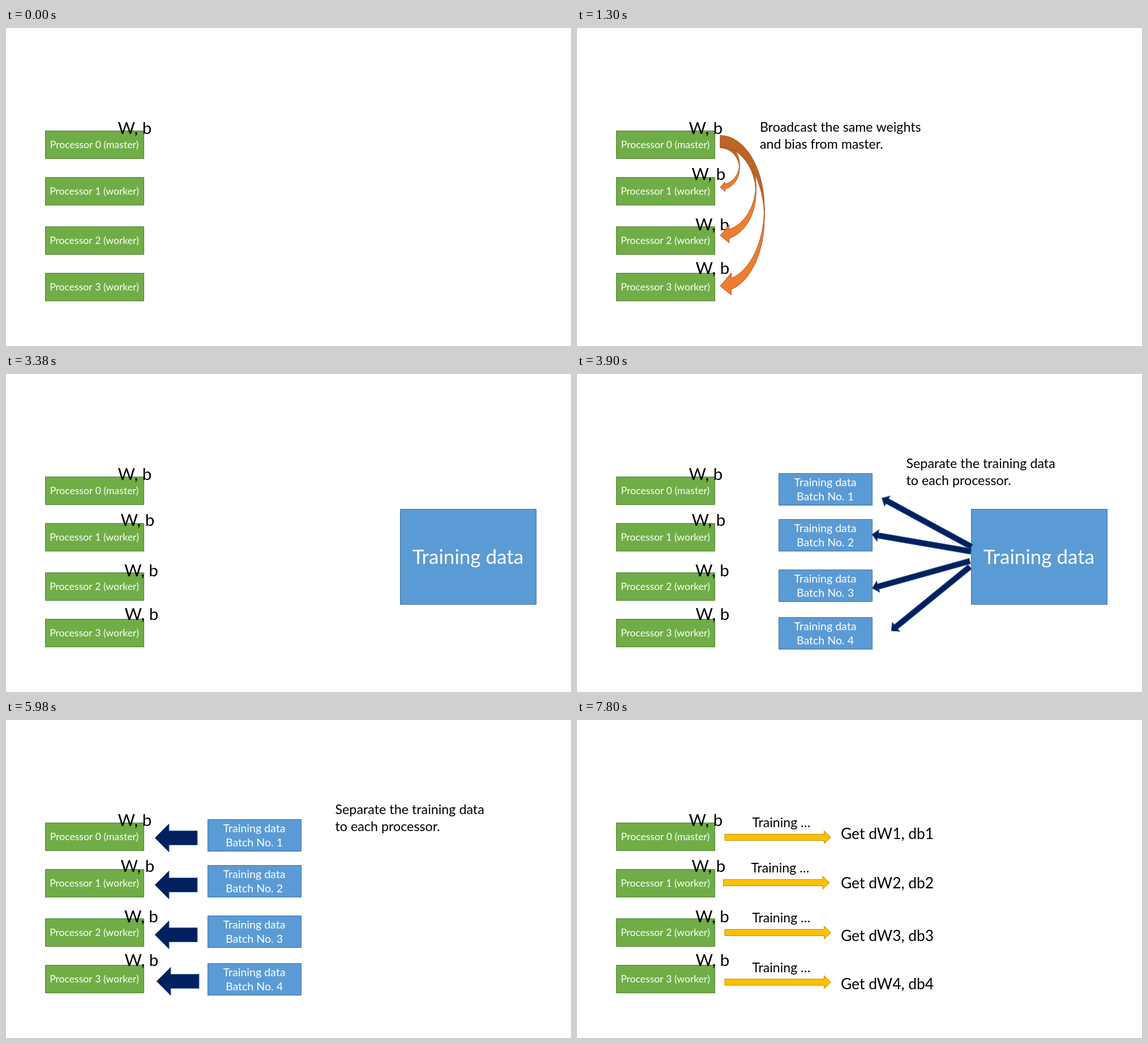
Write an HTML page with a canvas that moves like this. It is 998 px wide and 561 px high and loops after 8 s.

```html
<!DOCTYPE html>
<html lang="en">
<head>
<meta charset="utf-8">
<title>Data-parallel training</title>
<style>
  html, body { margin: 0; width: 100%; height: 100%; overflow: hidden; background: #fff; }
  canvas { display: block; }
</style>
</head>
<body>
<canvas id="stage" width="998" height="561"></canvas>
<script>
const ctx = document.getElementById('stage').getContext('2d');
const LOOP = 8000, STEP = 1300;
const GREEN = ['#70ad47', '#507e32'], BLUE = ['#5b9bd5', '#41719c'];
const NAVY = ['#002060', '#41719c'], GOLD = ['#ffc000', '#bc8c00'];
const ORANGE = ['#ed7d31', '#ae5a21'], RUST = ['#be6427', '#ae5a21'];

// One entry per processor row.
const rows = [
  { box: 181, wb: [197.5, 187], batch: 175, feed: [263, 208], train: [310, 189], run: [261, 207], get: 210 },
  { box: 263, wb: [202.5, 268], batch: 256, feed: [263, 291], train: [308, 269], run: [258.5, 287], get: 297 },
  { box: 350, wb: [209, 357], batch: 345, feed: [263, 379], train: [310, 357], run: [261, 375], get: 390 },
  { box: 432, wb: [209.5, 434], batch: 429, feed: [266, 461], train: [310, 445], run: [261, 462.5], get: 475 }
];

function paint([fill, line]) {
  ctx.fillStyle = fill;
  ctx.strokeStyle = line;
  ctx.lineWidth = 1;
  ctx.fill();
  ctx.stroke();
}

function box(x, y, w, h, colors) {
  ctx.beginPath();
  ctx.rect(x + .5, y + .5, w - 1, h);
  paint(colors);
}

function text(str, x, y, size, color = '#000', align = 'left') {
  ctx.font = `${size}px Lato, sans-serif`;
  ctx.textAlign = align;
  ctx.fillStyle = color;
  ctx.fillText(str, x, y);
}

// Straight block arrow from its tail to its tip.
function arrow(x0, y0, x1, y1, half, headLength, headHalf, colors) {
  const length = Math.hypot(x1 - x0, y1 - y0), neck = length - headLength;
  ctx.save();
  ctx.translate(x0, y0);
  ctx.rotate(Math.atan2(y1 - y0, x1 - x0));
  ctx.beginPath();
  ctx.moveTo(0, -half);
  ctx.lineTo(neck, -half);
  ctx.lineTo(neck, -headHalf);
  ctx.lineTo(length, 0);
  ctx.lineTo(neck, headHalf);
  ctx.lineTo(neck, half);
  ctx.lineTo(0, half);
  ctx.closePath();
  paint(colors);
  ctx.restore();
}

// Ribbon built from two equal ellipses, one shifted down by its thickness.
function curvedArrow(x, top, w, tipY) {
  const thick = w / 4, head = w / 4;
  const ry = (tipY - top - thick / 2) / 2;
  const upper = top + ry, lower = upper + thick;
  const bend = Math.acos(head / w);
  const neckY = upper + thick / 2 + ry * Math.sin(bend);

  ctx.beginPath();
  ctx.ellipse(x, lower, w, ry, 0, 0, bend);
  ctx.lineTo(x + head, neckY + w / 4);
  ctx.lineTo(x, tipY);
  ctx.lineTo(x + head, neckY - w / 4);
  ctx.ellipse(x, upper, w, ry, 0, bend, 0, true);
  ctx.closePath();
  paint(ORANGE);

  ctx.beginPath();
  ctx.ellipse(x, upper, w, ry, 0, -Math.PI / 2, 0);
  ctx.ellipse(x, lower, w, ry, 0, 0, -Math.PI / 2, true);
  ctx.closePath();
  paint(RUST);
}

function processors(shared) {
  rows.forEach(({ box: y }, i) => {
    box(69, y, 175, 49, GREEN);
    text(`Processor ${i} (${i ? 'worker' : 'master'})`, 156, y + 30.5, 17.6, '#fff', 'center');
  });
  rows.slice(0, shared ? 4 : 1).forEach(({ wb: [x, y] }) => text('W, b', x, y, 29.5));
}

function broadcast() {
  curvedArrow(253, 203, 34, 281);
  curvedArrow(253, 194, 63, 366);
  curvedArrow(253, 189.5, 78, 455.5);
  text('Broadcast the same weights', 323, 182.5, 23.2);
  text('and bias from master.', 323, 212.5, 23.2);
}

function dataset() {
  box(696, 238, 241, 168, BLUE);
  text('Training data', 816, 335, 35, '#fff', 'center');
}

function batches() {
  rows.forEach(({ batch: y }, i) => {
    box(356, y, 166, 56, BLUE);
    text('Training data', 438.5, y + 23, 19.6, '#fff', 'center');
    text(`Batch No. ${i + 1}`, 438.5, y + 48, 19.6, '#fff', 'center');
  });
  text('Separate the training data', 581.5, 166, 23.3);
  text('to each processor.', 581.5, 195.5, 23.3);
}

function split() {
  [[697, 305, 538.5, 219], [696, 313, 521, 283], [694, 330, 521.5, 378], [694, 340, 555, 453]]
    .forEach(ends => arrow(...ends, 5, 11, 10.5, NAVY));
}

function feed() {
  rows.forEach(({ feed: [x, y] }) => arrow(x + 75, y, x, y, 12.5, 25, 25, NAVY));
}

function train() {
  rows.forEach(({ train: [x, y] }) => text('Training …', x - .5, y, 23.1));
}

function results() {
  rows.forEach(({ run: [x, y], get }, i) => {
    arrow(x, y, x + 187.5, y, 5.5, 12, 11.5, GOLD);
    text(`Get dW${i + 1}, db${i + 1}`, 466, get, 26.4);
  });
}

const scenes = [
  [], [broadcast], [dataset], [dataset, batches, split], [batches, feed], [train], [train, results]
];

function draw(now) {
  const scene = Math.floor(now % LOOP / STEP);
  ctx.fillStyle = '#fff';
  ctx.fillRect(0, 0, 998, 561);
  processors(scene > 0);
  scenes[scene].forEach(part => part());
  requestAnimationFrame(draw);
}

draw(performance.now());
</script>
</body>
</html>
```
